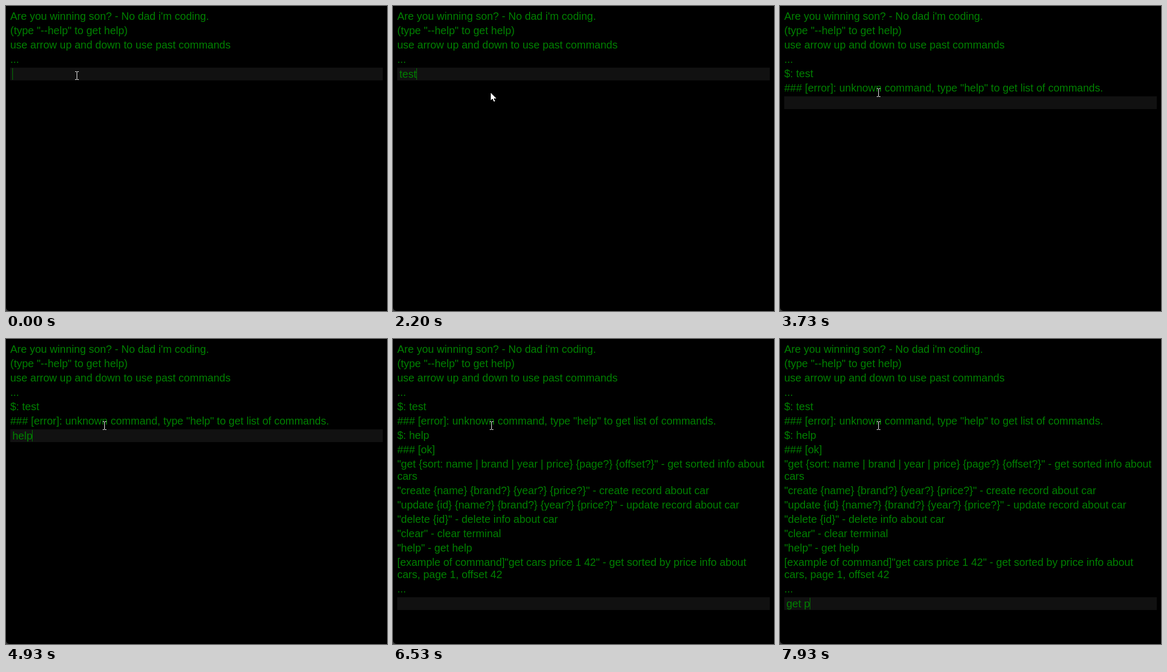
Write an HTML page that moves like this. It is 717 px wide and 574 px high and loops after 8 s.

```html
<!DOCTYPE html>
<html lang="en">
<head>
<meta charset="utf-8">
<title>Terminal</title>
<style>
  html, body { margin: 0; width: 100%; height: 100%; overflow: hidden; background: #000; }
  #stage {
    position: relative; width: 717px; height: 574px; overflow: hidden;
    background: #000; color: #008000;
    font: 20px/23px "Liberation Sans", Arial, sans-serif;
  }
  #log { position: absolute; left: 8px; top: 8px; width: 701px; }
  #log p { margin: 0 0 4px; }
  #field { height: 24px; background: #111; position: relative; }
  #typed { position: absolute; left: 4px; top: 1px; white-space: pre; }
  #caret { position: absolute; top: 1px; width: 1px; height: 22px; background: #008000; }
  svg { position: absolute; left: 0; top: 0; }
</style>
</head>
<body>
<div id="stage">
  <div id="log">
    <div id="lines"></div>
    <div id="field"><span id="typed"></span><i id="caret"></i></div>
  </div>
  <svg width="717" height="574" shape-rendering="crispEdges">
    <path d="M0 567V574H7A7 7 0 0 1 0 567Z" fill="#383838" shape-rendering="auto"/>
    <path id="beam" fill="#fff" d="M-3-8h3v1h1v-1h3v1h-3v14h3v1h-3v-1h-1v1h-3v-1h3v-14h-3z"/>
    <path id="arrow" fill="#fff" d="M0 0V14L3 11.3L5.8 17L8 16L5.5 10.5H10Z"/>
  </svg>
</div>
<script>
const LOOP = 8000;
const $ = id => document.getElementById(id);

const intro = [
  "Are you winning son? - No dad i'm coding.",
  '(type "--help" to get help)',
  "use arrow up and down to use past commands",
  "..."
];
const failed = [
  "$: test",
  '### [error]: unknown command, type "help" to get list of commands.'
];
const help = [
  "$: help",
  "### [ok]",
  '"get {sort: name | brand | year | price} {page?} {offset?}" - get sorted info about cars',
  '"create {name} {brand?} {year?} {price?}" - create record about car',
  '"update {id} {name?} {brand?} {year?} {price?}" - update record about car',
  '"delete {id}" - delete info about car',
  '"clear" - clear terminal',
  '"help" - get help',
  '[example of command]"get cars price 1 42" - get sorted by price info about cars, page 1, offset 42',
  "..."
];

// Each table row: start time, value
const output = [[0, intro], [2470, [...intro, ...failed]], [5330, [...intro, ...failed, ...help]]];
const typing = [
  [0, ""], [1600, "t"], [1800, "te"], [2000, "tes"], [2200, "test"],
  [2470, ""], [4600, "h"], [4670, "he"], [4870, "hel"], [4930, "help"],
  [5330, ""], [6800, "g"], [6870, "ge"], [7070, "get"], [7600, "get "], [7930, "get p"]
];
const blink = [
  [0, 1], [330, 0], [870, 1], [1400, 0], [1600, 1], [2670, 0], [3270, 1],
  [3730, 0], [4270, 1], [5470, 0], [6000, 1], [6530, 0], [6800, 1]
];
const pointer = [
  [0, ["beam", 133, 131]], [130, ["beam", 146, 135]], [200, ["arrow", 167, 148]],
  [270, ["arrow", 180, 159]], [330, ["arrow", 184, 163]], [2470, ["beam", 185, 163]]
];

const at = (table, t) => table.findLast(row => row[0] <= t)[1];

let shown;
function print(lines) {
  if (lines === shown) return;
  shown = lines;
  $("lines").replaceChildren(...lines.map(text => {
    const p = document.createElement("p");
    p.textContent = text;
    return p;
  }));
}

function draw(t) {
  print(at(output, t));

  const typed = $("typed");
  typed.textContent = at(typing, t);
  const width = typed.getBoundingClientRect().width;
  $("caret").style.left = 4 + Math.floor(width) + "px";
  $("caret").style.opacity = at(blink, t);

  const [shape, x, y] = at(pointer, t);
  for (const id of ["beam", "arrow"]) {
    $(id).style.display = id === shape ? "" : "none";
    $(id).setAttribute("transform", `translate(${x} ${y})`);
  }
}

const start = performance.now();
function tick() {
  draw((performance.now() - start) % LOOP);
  requestAnimationFrame(tick);
}
tick();
</script>
</body>
</html>
```
